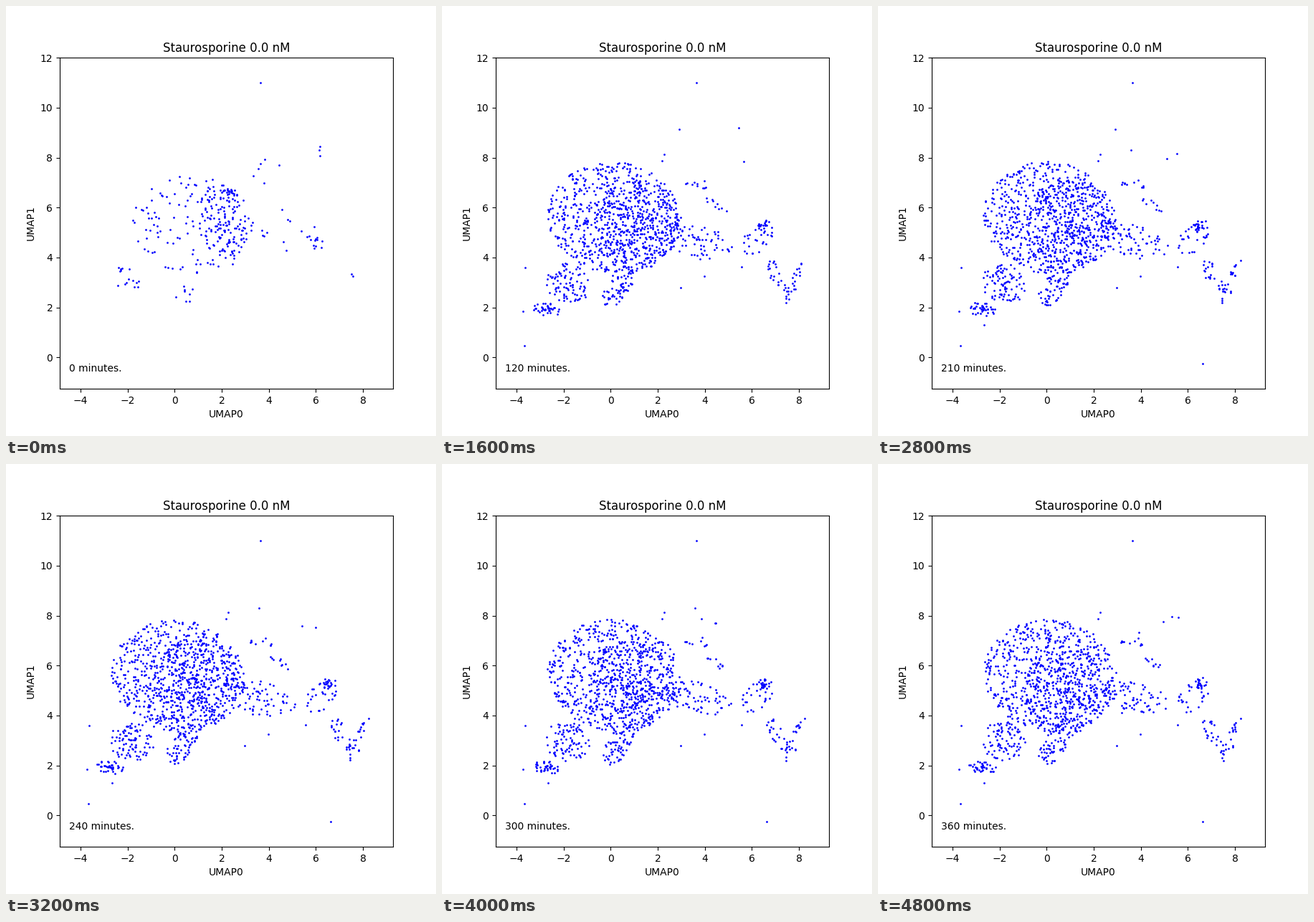
Recreate the animation shown at these times as a matplotlib script. Size 600 px wide and 600 px high, loop 5200 ms.

```python
import numpy as np
import matplotlib.pyplot as plt
from matplotlib.animation import FuncAnimation

FRAMES, INTERVAL = 13, 400
MEMORY = 0.97  # how much of its place a cell keeps per step
rng = np.random.default_rng(8)

# Blobs: count, centre, radii, angle, focus (0.5 is even, more is denser inside)
EARLY = [
    (120, (0.8, 5.3), (2.6, 2.0), -0.1, 0.5),
    (115, (2.0, 5.4), (0.95, 1.6), 0.2, 0.55),
    (22, (2.45, 6.4), (0.4, 0.45), 0, 0.6),
    (15, (-2.1, 3.1), (0.65, 0.6), -0.5, 0.5),
    (8, (0.45, 2.5), (0.4, 0.4), 0.5, 0.5),
    (13, (5.0, 5.1), (1.4, 1.0), 0, 0.5),
    (10, (6.1, 4.75), (0.35, 0.45), 0, 0.6),
    (6, (4.0, 7.2), (0.7, 0.8), 0, 0.5),
    (3, (6.15, 8.1), (0.12, 0.4), 0, 0.5),
    (2, (7.65, 3.3), (0.2, 0.06), 0, 0.2),
]
LATER = [
    (600, (0.15, 5.6), (2.85, 2.25), -0.1, 0.5),
    (85, (-1.85, 2.95), (0.95, 0.85), -0.5, 0.5),
    (38, (-2.75, 1.92), (0.6, 0.28), -0.1, 0.6),
    (65, (0.3, 2.85), (0.95, 0.5), 1.0, 0.5),
    (65, (3.7, 4.65), (1.5, 0.75), -0.2, 0.55),
    (26, (6.2, 4.75), (0.75, 0.5), 0.7, 0.5),
    (20, (6.55, 5.3), (0.4, 0.22), 0.2, 0.6),
    (24, (7.1, 3.15), (0.9, 0.3), -1.1, 0.5),
    (20, (7.8, 3.0), (0.9, 0.2), 1.2, 0.5),
    (10, (3.7, 6.95), (0.55, 0.2), 0, 0.5),
    (9, (4.6, 6.05), (0.65, 0.15), -0.5, 0.5),
]
CORE = (300, (0, 0), (1.8, 1.8), 0, 0.55)

# Lone cells: x, y, first step, last step
LONERS = [
    (3.65, 11, 0, 12), (2.28, 8.14, 1, 12), (2.18, 7.88, 1, 12),
    (2.92, 9.14, 1, 7), (5.45, 9.2, 2, 4), (3.6, 8.3, 7, 11),
    (-3.62, 3.59, 1, 12), (-3.66, 0.47, 1, 12), (-3.73, 1.84, 1, 12),
    (3.98, 3.26, 1, 12), (2.97, 2.8, 1, 12), (5.58, 3.62, 4, 12),
    (-2.65, 1.3, 6, 12), (6.63, -0.25, 6, 12), (8.25, 3.87, 5, 12),
]


def place(z, blob):
    """Map normal deviates into the blob's tilted ellipse."""
    _, centre, radii, angle, focus = blob
    size = np.linalg.norm(z, axis=1, keepdims=True)
    reach = (1 - np.exp(-size ** 2 / 2)) ** focus
    x, y = (z / size * reach * radii).T
    c, s = np.cos(angle), np.sin(angle)
    return np.column_stack([c * x - s * y, s * x + c * y]) + centre


def wander(blob):
    """Yield the blob's cells for every step after the first."""
    z = rng.normal(size=(blob[0], 2))
    for step in range(1, FRAMES):
        share = min(1, 0.6 + 0.2 * step)
        yield step, place(z[:int(share * len(z))], blob)
        z = MEMORY * z + np.sqrt(1 - MEMORY ** 2) * rng.normal(size=z.shape)


def core_centre(step):
    return np.array([0.85 + np.exp(-step / 3),
                     5.0 + 0.4 * np.sin(np.pi * step / 12)])


def build_clouds():
    clouds = [[place(rng.normal(size=(blob[0], 2)), blob) for blob in EARLY]]
    clouds += [[] for _ in range(1, FRAMES)]
    for blob in LATER:
        for step, cells in wander(blob):
            clouds[step].append(cells)
    for step, cells in wander(CORE):
        clouds[step].append(cells + core_centre(step))
        clouds[step].append(rng.uniform((3.5, 7.2), (6, 8.2), (step // 3, 2)))
    for step, parts in enumerate(clouds):
        parts.append([(x, y) for x, y, a, b in LONERS if a <= step <= b])
    return [np.vstack(parts) for parts in clouds]


CLOUDS = build_clouds()

fig, ax = plt.subplots(figsize=(6, 6), dpi=100)
ax.set(xlim=(-4.88, 9.28), ylim=(-1.26, 12.01), xlabel="UMAP0",
       ylabel="UMAP1", title="Staurosporine 0.0 nM")
dots, = ax.plot([], [], "bo", markersize=1)
clock = ax.text(-4.48, -0.57, "")


def draw(step):
    dots.set_data(*CLOUDS[step].T)
    clock.set_text(f"{30 * step} minutes.")
    return dots, clock


anim = FuncAnimation(fig, draw, frames=FRAMES, interval=INTERVAL,
                     init_func=lambda: draw(0), repeat=True, repeat_delay=0)
plt.show()
```
